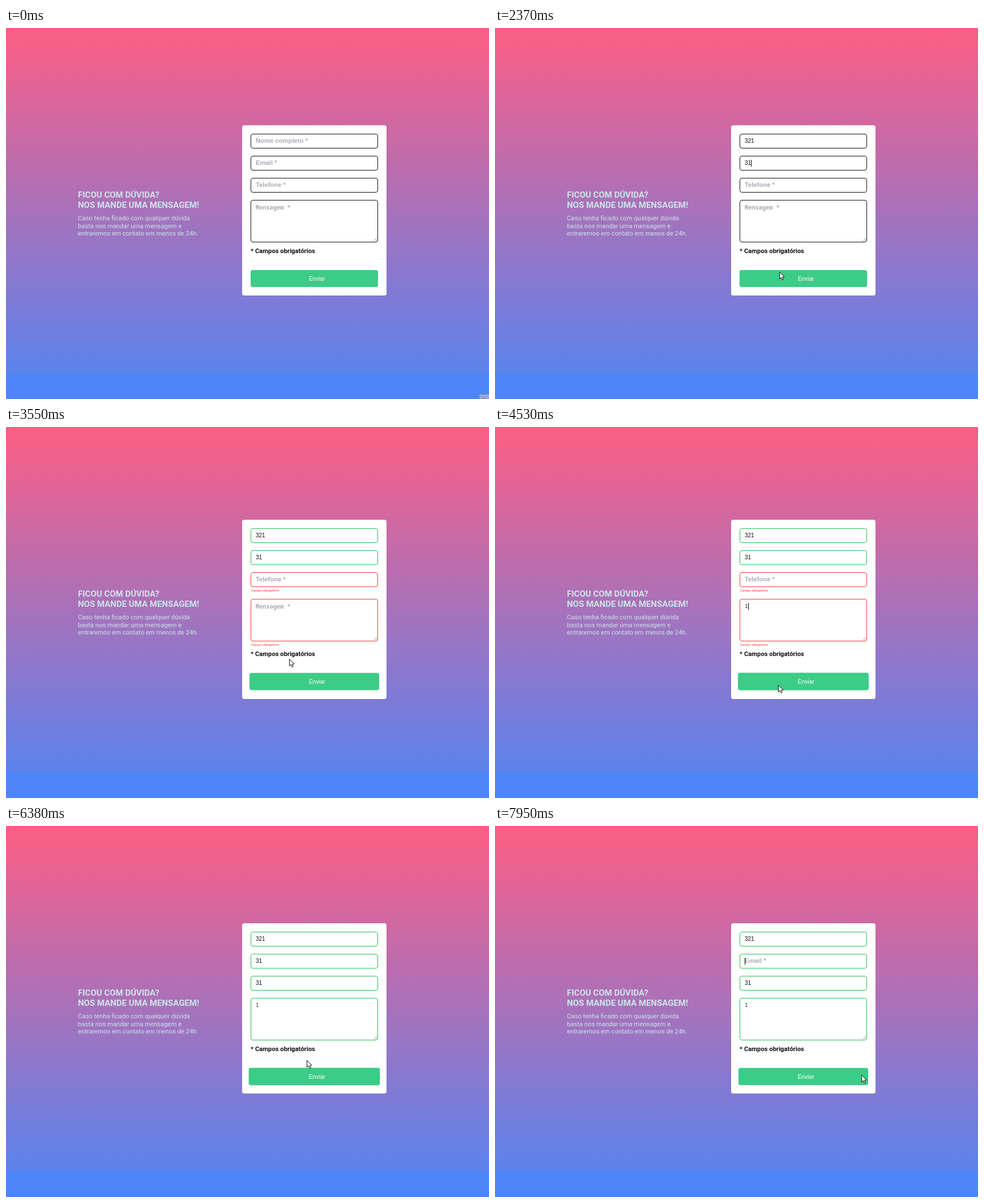
An HTML page with a canvas for the animation above (8000 ms loop, 853 px wide and 656 px high).

```html
<!DOCTYPE html>
<html lang="pt-BR">
<head>
<meta charset="utf-8">
<title>Formulário de contato</title>
<style>
html, body { margin: 0; width: 100%; height: 100%; overflow: hidden; background: #4c86f6; }
canvas { display: block; }
</style>
</head>
<body>
<canvas id="stage" width="853" height="656"></canvas>
<script>
const ctx = document.getElementById('stage').getContext('2d');
const LOOP = 8000, BLINK = 530, HOVER = 280;
const SANS = '"Liberation Sans", Arial, sans-serif';
const MONO = '"Noto Sans Mono", monospace';
const ROBOTO = 'Roboto, sans-serif';
const GREEN = '#27c152', RED = '#f53b3b', HINT = '#aea9b4';

// Pointer path: time, x, y
const path = [
  [70, 850, 655], [620, 508, 238], [760, 500, 231], [890, 500, 234],
  [1030, 496, 198], [1760, 496, 198], [1910, 490, 239], [2200, 490, 239],
  [2330, 502, 428], [2370, 502, 431], [2510, 503, 440], [3400, 503, 440],
  [3550, 500, 410], [3720, 489, 350], [4220, 489, 350], [4310, 495, 436],
  [4530, 500, 456], [4800, 500, 456], [4880, 497, 425], [5240, 476, 274],
  [5700, 476, 274], [5820, 520, 434], [5910, 530, 446], [6010, 540, 502],
  [6100, 538, 458], [6300, 533, 440], [6380, 531, 415], [6520, 490, 290],
  [6570, 458, 239], [6670, 274, 239], [6900, 274, 239], [7060, 505, 262],
  [7270, 512, 393], [7340, 512, 393], [7400, 521, 393], [7540, 521, 393],
  [7790, 620, 428], [7950, 647, 440], [8000, 648, 441]
];

// Pointer enters and leaves the button in turn
const hovers = [2330, 3430, 4310, 4870, 5810, 5980, 6100, 6370, 7790];
const submits = [2660, 4650, 5870];
const focuses = [[1040, 0], [1920, 1], [2660, -1], [3790, 3], [4650, -1], [5290, 2], [5870, -1], [6570, 1]];
const drag = { from: 6570, to: 6740 };

const fields = [
  { hint: 'Nome completo *', typed: [[1180, '3'], [1290, '32'], [1400, '321']] },
  { hint: 'Email *', typed: [[2030, '3'], [2120, '31'], [6740, '']] },
  { hint: 'Telefone *', typed: [[5390, '3'], [5460, '31']] },
  { hint: 'Mensagem *', typed: [[4130, '1']], area: true }
];

const lastBefore = (list, t) => list.filter(e => e[0] <= t).pop();
const valueAt = (field, t) => (lastBefore(field.typed, t) || [0, ''])[1];

function pointerAt(t) {
  const i = path.findIndex(p => p[0] > t);
  const a = path[i - 1], b = path[i];
  const k = (t - a[0]) / (b[0] - a[0]);
  return { x: a[1] + (b[1] - a[1]) * k, y: a[2] + (b[2] - a[2]) * k };
}

function hoverAt(t) {
  let level = 0;
  hovers.forEach((start, i) => {
    if (start > t) return;
    const span = Math.min(t, hovers[i + 1] || LOOP) - start;
    level += (i % 2 ? -1 : 1) * span / HOVER;
    level = Math.max(0, Math.min(1, level));
  });
  return level * level * (3 - 2 * level);
}

// Each error line adds 7.5px; the card stays vertically centred
function layoutAt(t) {
  const sent = submits.filter(s => s <= t).pop();
  const bad = fields.map(f => sent !== undefined && !valueAt(f, sent));
  const extra = 7.5 * bad.filter(Boolean).length;
  const top = 172 - extra / 2;
  let y = top + 15;
  const boxes = fields.map((f, i) => {
    const h = f.area ? 75 : 26;
    const box = { y: Math.floor(y), h, bad: bad[i] };
    y += h + 13 + (bad[i] ? 7.5 : 0);
    return box;
  });
  return {
    sent: sent !== undefined, boxes,
    top: Math.floor(top), bottom: Math.round(473 + extra / 2),
    note: Math.floor(398 + extra / 2), button: Math.floor(428 + extra / 2)
  };
}

function text(str, x, y, font, color, align = 'left') {
  ctx.font = font;
  ctx.fillStyle = color;
  ctx.textAlign = align;
  ctx.fillText(str, x, y);
}

function roundRect(x, y, w, h, r) {
  ctx.beginPath();
  ctx.roundRect(x, y, w, h, r);
}

function drawBackground() {
  const g = ctx.createLinearGradient(0, 0, 0, 656);
  g.addColorStop(0, '#fd5e84');
  g.addColorStop(0.932, '#5b83ec');
  g.addColorStop(0.932, '#4c86f6');
  g.addColorStop(1, '#4c86f6');
  ctx.fillStyle = g;
  ctx.fillRect(0, 0, 853, 656);
}

function drawIntro() {
  const color = '#cbe6e6';
  ['FICOU COM DÚVIDA?', 'NOS MANDE UMA MENSAGEM!'].forEach((s, i) =>
    text(s, 127, 300 + 18 * i, `700 15px ${ROBOTO}`, color));
  ['Caso tenha ficado com qualquer dúvida', 'basta nos mandar uma mensagem e',
    'entraremos em contato em menos de 24h.'].forEach((s, i) =>
    text(s, 127, Math.floor(340.5 + 13.5 * i), `11.25px ${ROBOTO}`, color));
}

function drawCaret(x, y, since) {
  if (Math.floor(since / BLINK) % 2) return;
  ctx.fillStyle = '#000';
  ctx.fillRect(Math.round(x), y, 1, 12);
}

function drawField(i, layout, t) {
  const field = fields[i], box = layout.boxes[i], value = valueAt(field, t);
  const base = box.y + (field.area ? 17 : 16);
  const font = field.area ? `9.2px ${MONO}` : `10px ${SANS}`;
  const hintFont = field.area ? `700 10.3px ${MONO}` : `700 11.25px ${SANS}`;

  roundRect(432.5, box.y + 0.5, 224, box.h - 1, 3.5);
  ctx.strokeStyle = !layout.sent ? '#111' : box.bad ? RED : GREEN;
  ctx.lineWidth = 1;
  ctx.stroke();

  if (value) text(value, 441, field.area ? base - 1 : base, font, '#111');
  else text(field.hint, 441, base, hintFont, HINT);

  ctx.font = font;
  const end = 441 + ctx.measureText(value).width;
  const focus = lastBefore(focuses, t);
  const selecting = i === 1 && t >= drag.from && t < drag.to;
  if (selecting) {
    const left = Math.max(441, Math.min(end, pointerAt(t).x));
    ctx.save();
    ctx.beginPath();
    ctx.rect(left, box.y + 7, end - left, 12);
    ctx.clip();
    ctx.fillStyle = '#3390ff';
    ctx.fillRect(left, box.y + 7, end - left, 12);
    text(value, 441, base, font, '#fff');
    ctx.restore();
  } else if (focus && focus[1] === i) {
    const key = lastBefore(field.typed, t);
    drawCaret(end, box.y + 7, t - Math.max(focus[0], key ? key[0] : 0));
  }

  if (field.area) {
    const b = box.y + box.h - 2;
    ctx.strokeStyle = '#667a70';
    ctx.lineWidth = 0.8;
    ctx.beginPath();
    ctx.moveTo(649.5, b); ctx.lineTo(655.5, b - 6);
    ctx.moveTo(653, b); ctx.lineTo(655.5, b - 2.5);
    ctx.stroke();
  }
  if (box.bad) text('Campo obrigatório', 432.5, box.y + box.h + 7.5, `6px ${ROBOTO}`, RED);
}

function drawCard(t) {
  const layout = layoutAt(t);
  ctx.fillStyle = '#fff';
  roundRect(417, layout.top, 255, layout.bottom - layout.top, 3.75);
  ctx.fill();
  fields.forEach((_, i) => drawField(i, layout, t));
  text('* Campos obrigatórios', 432, layout.note, `700 11.25px ${ROBOTO}`, '#111');

  const s = 1 + 0.03 * hoverAt(t), mid = layout.button + 15;
  ctx.save();
  ctx.translate(544.5, mid);
  ctx.scale(s, s);
  ctx.fillStyle = '#3dcc87';
  roundRect(-112.5, -15, 225, 30, 3.75);
  ctx.fill();
  text('Enviar', 4.6, 3.5, `10px ${SANS}`, '#fff', 'center');
  ctx.restore();
  return layout;
}

function drawArrow(x, y) {
  ctx.save();
  ctx.translate(x + 0.5, y + 0.5);
  ctx.beginPath();
  [[0, 0], [0, 12], [2.8, 9.6], [4.8, 14], [6.8, 13.1], [4.9, 8.8], [8.6, 8.6]]
    .forEach(p => ctx.lineTo(...p));
  ctx.closePath();
  ctx.fillStyle = '#fff';
  ctx.fill();
  ctx.strokeStyle = '#111';
  ctx.lineWidth = 1;
  ctx.stroke();
  ctx.restore();
}

function drawBeam(x, y) {
  ctx.fillStyle = '#222';
  ctx.fillRect(x, y - 5, 1, 11);
  for (const edge of [y - 6, y + 5]) {
    ctx.fillRect(x - 3, edge, 3, 1);
    ctx.fillRect(x + 1, edge, 3, 1);
  }
}

function drawPointer(t, layout) {
  const p = pointerAt(t), x = Math.round(p.x), y = Math.round(p.y);
  const inField = x > 432 && x < 657 && layout.boxes.some(b => y >= b.y && y < b.y + b.h);
  const onNote = x > 432 && x < 546 && y > layout.note - 11 && y < layout.note + 4;
  const dragging = t >= drag.from && t < drag.to;
  (inField || onNote || dragging ? drawBeam : drawArrow)(x, y);
}

function drawCorner() {
  ctx.fillStyle = '#9aa6d2';
  ctx.fillRect(836, 648, 17, 8);
  ctx.fillStyle = '#5f7fd0';
  ctx.fillRect(841, 654, 2, 2);
  ctx.fillRect(844, 654, 2, 2);
}

function draw(t) {
  drawBackground();
  drawIntro();
  const layout = drawCard(t);
  if (t < 70) drawCorner();
  else drawPointer(t, layout);
}

const start = performance.now();
function tick() {
  draw((performance.now() - start) % LOOP);
  requestAnimationFrame(tick);
}
tick();
</script>
</body>
</html>
```
